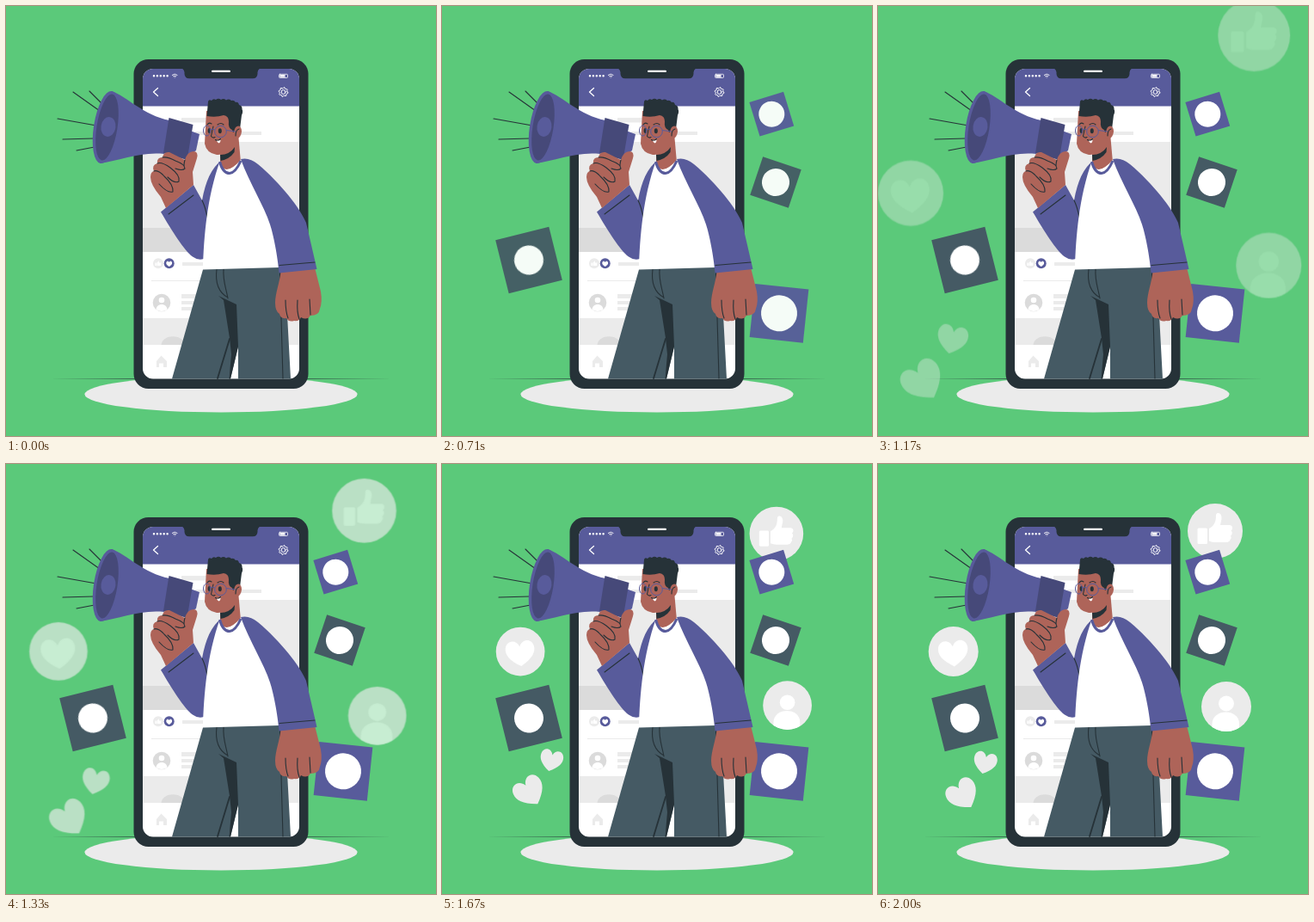
These frames come from a looping animation (500 by 500 pixels, 2040 ms). An HTML page:

```html
<!DOCTYPE html>
<html lang="en">
<head>
<meta charset="utf-8">
<title>Social announcement</title>
<style>
html, body { margin: 0; width: 100%; height: 100%; overflow: hidden; background: #5bc97a; }
svg { display: block; width: 100%; height: 100%; }
.purple { fill: #585b9b; }
.deep { fill: #464979; }
.slate { fill: #455a64; }
.dark { fill: #263238; }
.skin { fill: #ae6459; }
.white { fill: #fff; }
.pale { fill: #ebebeb; }
.grey { fill: #dbdbdb; }
.ink { fill: none; stroke: #263238; stroke-width: 1.1; stroke-linecap: round; stroke-linejoin: round; }
.line { fill: none; stroke: #fff; stroke-width: 1.3; stroke-linecap: round; stroke-linejoin: round; }
</style>
</head>
<body>
<svg viewBox="0 0 500 500">
  <defs>
    <path id="heart" d="M0 1C-.8.5-1.08.05-1-.42C-.88-1.02-.2-1.04 0-.45C.2-1.04.88-1.02 1-.42C1.08.05.8.5 0 1Z"/>
    <clipPath id="screen"><rect x="159" y="73" width="182" height="360.5" rx="12"/></clipPath>
    <clipPath id="disc"><circle cx="405" cy="282" r="29"/></clipPath>
  </defs>

  <path class="dark" d="M51 433.4L250 432.8L449 433.4L250 434Z"/>
  <ellipse class="pale" cx="250" cy="451.5" rx="158.5" ry="21"/>

  <g id="bubbles">
    <g class="pale">
      <circle cx="87.7" cy="218" r="29"/>
      <circle cx="392" cy="78" r="32"/>
      <circle cx="405" cy="282" r="29"/>
      <use href="#heart" transform="translate(124.5 347) rotate(13) scale(13.4)"/>
      <use href="#heart" transform="translate(98.5 384) rotate(-33) scale(18)"/>
    </g>
    <g class="white">
      <use href="#heart" transform="translate(87.5 219.5) rotate(-5) scale(17 16)"/>
      <rect x="371.5" y="74.5" width="11.5" height="18.5" rx="1.5"/>
      <path d="M385 75C391 72 393 67 393 60Q393 56.5 396 57Q400 58 399.5 64L398 71H409Q412.5 71.5 412 75Q411.5 77 410.5 77.5Q412.5 79 411.5 81.5Q411 83 410 83.5Q411.5 86 409.5 88Q409 90.5 405 91H392Q388 91 385 89.5Z"/>
      <circle cx="405" cy="278.5" r="9"/>
      <path clip-path="url(#disc)" d="M388.5 312V302C389 284 420 284 420 302V312Z"/>
    </g>
  </g>

  <g id="tiles"></g>

  <!-- phone -->
  <rect class="dark" x="148.5" y="62" width="203" height="383" rx="17"/>
  <g clip-path="url(#screen)">
    <path class="white" d="M159 73H341V434H159Z"/>
    <path class="purple" d="M159 73H341V116.5H159Z"/>
    <path class="dark" d="M203 72Q207 73 207.5 77V79Q208 84.3 213 84.3H287Q292 84.3 292.5 79V77Q293 73 297 72Z"/>
    <g class="pale">
      <path d="M159 158H341V286H159ZM159 363H341V394H159Z"/>
      <path d="M204 130H234V135.5H204ZM220 146H297V150H220ZM205 298H229V302H205ZM204 335H224V340H204ZM204 343H224V347H204ZM204 350H224V354H204ZM169 319H331V320H169Z"/>
      <circle cx="177" cy="299.3" r="6"/>
      <path d="M180.5 406.5L187 413V420H183V415.5H178V420H175V413Z"/>
    </g>
    <g class="grey">
      <path d="M159 258H341V286H159Z"/>
      <circle cx="181" cy="345" r="10.3"/>
      <path d="M180.5 394C182 381 206 381 208 394Z"/>
    </g>
    <g class="white">
      <circle cx="181" cy="342" r="3.3"/>
      <path d="M174.5 353C175 345 187 345 187.5 353Q181 357 174.5 353Z"/>
      <path d="M173.5 298.5H175V302H173.5ZM175.5 299L177.5 296L178 298.5H180.5L180 302H175.5Z"/>
    </g>
    <circle class="purple" cx="189.7" cy="299.3" r="6"/>
    <use class="white" href="#heart" transform="translate(189.7 299.7) scale(3.4)"/>
  </g>
  <rect class="white" x="239" y="74.8" width="22" height="2.3" rx="1.1"/>
  <path class="line" style="stroke-width:2.5" stroke-dasharray="0 3.9" d="M172 81.2H188"/>
  <path class="line" style="stroke-width:.9" d="M193.3 80.3Q196.200 77.8 199.1 80.3M194.7 81.7Q196.200 80.5 197.7 81.7M196.200 83V83.1"/>
  <rect class="line" style="stroke-width:.8" x="317.5" y="79.3" width="10" height="4.2" rx="1"/>
  <path class="white" d="M318.3 80.1H324.5V82.7H318.3Z"/>
  <path class="line" d="M176.5 95.5L171.5 100L176.5 104.5"/>
  <circle class="line" cx="322.5" cy="100" r="2.4" style="stroke-width:1"/>
  <path id="gear" class="line" style="stroke-width:1"/>

  <!-- trousers -->
  <path class="slate" d="M230 303L193 433.5H261L270 396V433.5H331L324 303Z"/>
  <path class="dark" d="M247 337L268 347L270 396L261 433.5H259.5L262 405L260 386L253 342Z"/>
  <path class="ink" style="stroke-width:1.8" d="M260 387L246 433"/>
  <path class="ink" d="M245 306C243 322 247 333 258 339M253 306C252 320 256 328 258 340M318.5 309L322 433"/>

  <!-- raised sleeve -->
  <path class="purple" d="M250 180Q234 192 228 226L218 208L180 239.5C194 263 207 284 217 291.5Q224 296.5 230 294L242 240Z"/>
  <path class="ink" d="M228 226Q232 234 234 246M189 242L218 220"/>

  <!-- neck and shirt -->
  <path class="skin" d="M249 160V185Q255 200 273 182L270 148Z"/>
  <path class="dark" d="M249 173Q260 173 266 164L265.5 170Q260 178 249.5 180Z"/>
  <path class="white" d="M248.5 181Q254 200 273 179C282 202 302 235 312 262L318 304L229 306.5C230 267 234 222 248.5 181Z"/>
  <path d="M248.5 181Q252 194.500 260 194.500Q267 194 273 180" fill="none" stroke="#585b9b" stroke-width="3"/>

  <!-- lowered arm -->
  <path class="skin" d="M320 306C318 323 313 334 313 345Q313 355 318 358Q319 364 326 363Q329 368 335 366Q341 367 343 362Q350 366 354 360Q364 360 365 352Q368 344 366 332L359 304Z"/>
  <path class="ink" d="M325 342Q325 355 328 363M339 342Q338 356 341 364M353 341L354 359"/>
  <path class="purple" d="M273 178Q283 175.500 293 184C320 207 342 235 349 252L361.500 306L317.5 310.5C316 291 311 266 307 254C300 232 283 206 273 178Z"/>
  <path class="ink" d="M318 301.5L359 298"/>

  <!-- head -->
  <path class="skin" d="M233 122L231 160Q233 171 245 173Q257 174 264 162L272 145V124Z"/>
  <path class="dark" d="M233.5 128L235 111Q236 108 239 110Q241 107 244 109Q247 106.5 250 109Q253 107 256 109.5Q259 107.5 262 110Q265 109 267 112Q270 111 271 115Q275 116 274.5 120Q276 123 274 127L272 143L264 147L263 144Q258 142 259 134Q259 128 253 127Q244 130 233.5 128Z"/>
  <path class="skin" d="M265 146Q267 138 272 140Q276 145 272 152Q268 157 264 153Z"/>
  <path class="ink" d="M267 151Q267 144 271 143M234 138Q236 135 239 137M246 138Q250 135 253 138M241 140L238.500 151.500Q240.500 154 243 152.500M243.500 155.500Q246.500 157.500 249.500 154.500"/>
  <ellipse class="dark" cx="236.5" cy="145" rx="1.9" ry="2.9"/>
  <ellipse class="dark" cx="248.8" cy="145.3" rx="2" ry="3"/>
  <path class="white" d="M245 156.500Q247.500 157.500 249.500 155.500Q249.500 159 247.500 159.500Q245.500 158.500 245 156.500Z"/>
  <g fill="none" stroke="#585b9b" stroke-width="1">
    <ellipse cx="233.500" cy="145" rx="4" ry="6"/>
    <circle cx="249.5" cy="146" r="6.8"/>
    <path d="M237.5 144Q240 142 242.7 144M256.3 144.5L267 146"/>
  </g>

  <!-- megaphone -->
  <path class="ink" d="M78 100L109 122M97 99L113 115M60 131L105 139M66 155L102 154M82 168L108 163"/>
  <path class="purple" d="M123 99C140 105 160 127 190 133L184 172C156 169 132 180 109 183Z"/>
  <path class="purple" d="M214 145L225 149L221 168L208 177Z"/>
  <path class="deep" d="M189.5 130L217.5 138L210.5 179L183 171Z"/>
  <ellipse class="purple" cx="116.5" cy="141" rx="14.5" ry="42.5" transform="rotate(9 116.5 141)"/>
  <ellipse class="deep" cx="117.5" cy="141" rx="12" ry="39" transform="rotate(9 117.5 141)"/>
  <ellipse class="purple" cx="119" cy="140.5" rx="8.5" ry="11.5" transform="rotate(9 119 140.5)"/>

  <!-- gripping hand -->
  <path class="skin" d="M186 235L180 222Q168 208 168 199Q168 193 172 192Q169 185 176 183Q175 176 182 176Q183 169 190 170L208 179Q211 169 218 169Q224 169 222 177L217 193L218 208Z"/>
  <path class="ink" d="M182 176Q188 175 197 180Q208 184 208 189Q205 192 197 189M176 183Q181 181 191 188Q203 197 201 204Q196 207 188 199M172 192Q177 190 184 198Q195 208 194 216Q188 218 178 207M208 179Q206 186 208 189"/>
</svg>
<script>
const LOOP = 2040, CENTER = [247, 219];
const $ = id => document.getElementById(id);
const bubbles = $('bubbles'), tiles = $('tiles');

// x, y, side, angle, colour, disc radius
tiles.innerHTML = [
  [101, 295.5, 64, -14, 'slate', 17],
  [383.3, 125.7, 41.5, -17, 'purple', 15],
  [388, 205, 47, 18.5, 'slate', 16],
  [392, 357.3, 62.5, 6, 'purple', 21]
].map(([x, y, side, angle, colour, r]) =>
  `<g transform="translate(${x} ${y}) rotate(${angle})">
    <rect class="${colour}" x="${-side / 2}" y="${-side / 2}" width="${side}" height="${side}"/>
    <circle class="white" r="${r}"/></g>`).join('');

const teeth = Array.from({ length: 32 }, (_, i) => {
  const a = (i + .5) * Math.PI / 16, r = i % 4 < 2 ? 5.4 : 4.3;
  return `${322.5 + r * Math.cos(a)} ${100 + r * Math.sin(a)}`;
});
$('gear').setAttribute('d', `M${teeth.join('L')}Z`);

const clamp = v => Math.min(1, Math.max(0, v));
const bezier = (a, b, u) => 3 * a * u * (1 - u) ** 2 + 3 * b * u * u * (1 - u) + u ** 3;

// Cubic ease that overshoots before it settles
function overshoot(x) {
  let lo = 0, hi = 1;
  for (let i = 0; i < 24; i++) {
    const mid = (lo + hi) / 2;
    if (bezier(.36, .5, mid) < x) lo = mid; else hi = mid;
  }
  return bezier(-.01, 1.38, hi);
}

function draw(now) {
  const t = now % LOOP;
  tiles.setAttribute('opacity', t < 80 ? 0 : clamp((t - 40) / 710));

  const p = overshoot(clamp((t - 780) / 1200));
  const scale = 1.5 - p / 2;
  const [x, y] = CENTER;
  bubbles.setAttribute('opacity', t < 1000 ? 0 : clamp(p));
  bubbles.setAttribute('transform', `translate(${x} ${y}) scale(${scale}) translate(${-x} ${-y})`);
  requestAnimationFrame(draw);
}
draw(0);
</script>
</body>
</html>
```
